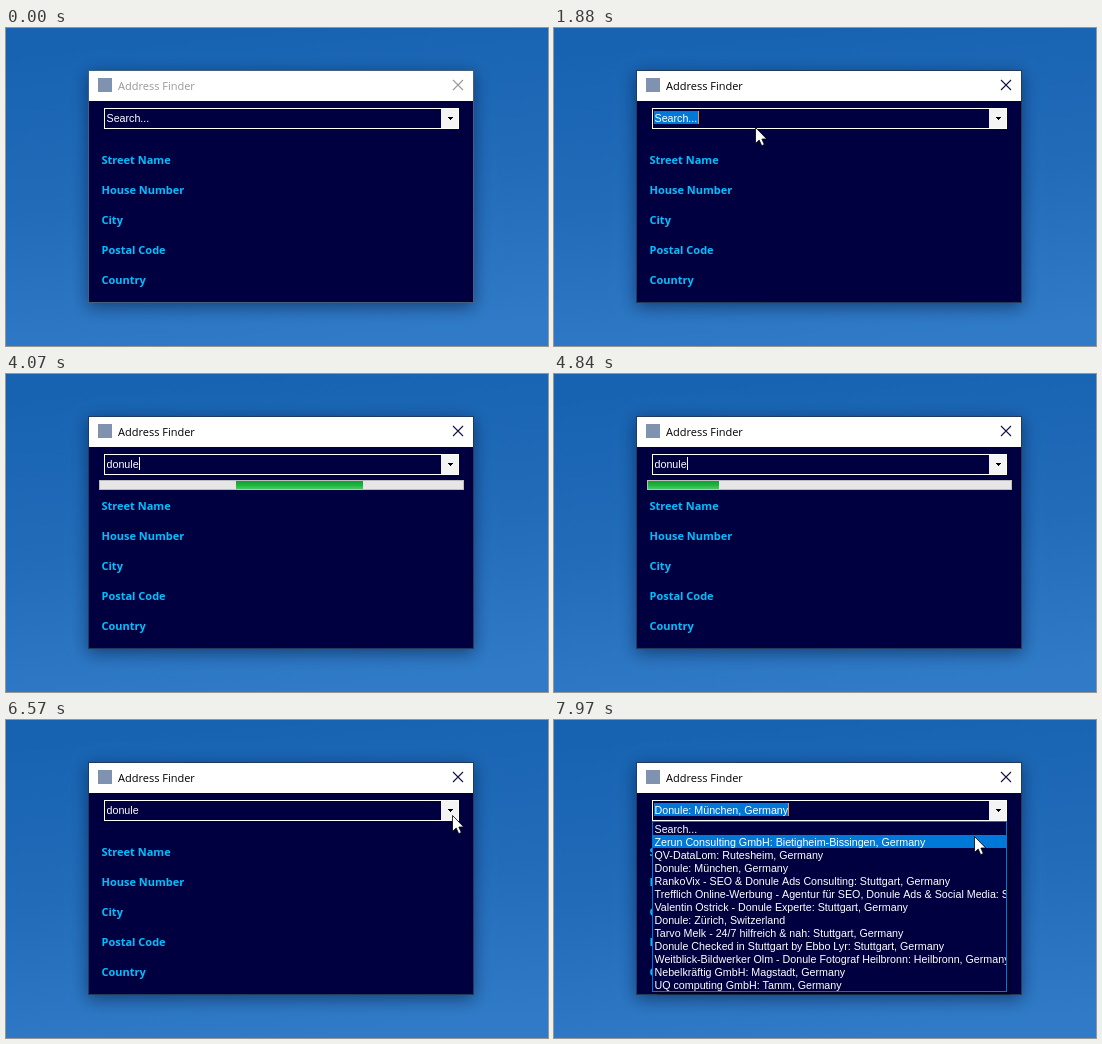
Recreate the animation shown at these times as an HTML page with a canvas. Size 542 by 318 pixels, loop 8 s.

```html
<!DOCTYPE html>
<html lang="en">
<head>
<meta charset="utf-8">
<title>Address Finder</title>
<style>
html, body { margin: 0; width: 100%; height: 100%; overflow: hidden; background: #2269b6; }
canvas { display: block; width: 542px; height: 318px; }
</style>
</head>
<body>
<canvas id="stage" width="542" height="318"></canvas>
<script>
const ctx = document.getElementById('stage').getContext('2d');
const LOOP = 8000, TICK = 156.25, LEAD = 18;
const NAVY = '#000040', BLUE = '#0078d7', SKY = '#00bfff';
const UI = '"Open Sans", "Noto Sans", sans-serif';
const FIELD = '10.7px "Liberation Sans", Arial, sans-serif';

const LABELS = ['Street Name', 'House Number', 'City', 'Postal Code', 'Country'];
const RESULTS = [
  'Search...',
  'Zerun Consulting GmbH: Bietigheim-Bissingen, Germany',
  'QV-DataLom: Rutesheim, Germany',
  'Donule: München, Germany',
  'RankoVix - SEO & Donule Ads Consulting: Stuttgart, Germany',
  'Trefflich Online-Werbung - Agentur für SEO, Donule Ads & Social Media: Stuttgart',
  'Valentin Ostrick - Donule Experte: Stuttgart, Germany',
  'Donule: Zürich, Switzerland',
  'Tarvo Melk - 24/7 hilfreich & nah: Stuttgart, Germany',
  'Donule Checked in Stuttgart by Ebbo Lyr: Stuttgart, Germany',
  'Weitblick-Bildwerker Olm - Donule Fotograf Heilbronn: Heilbronn, Germany',
  'Nebelkräftig GmbH: Magstadt, Germany',
  'UQ computing GmbH: Tamm, Germany'
];

// Events, counted in screen ticks
const ACTIVE = 5, BAR_ON = 17, BAR_OFF = 39, OPEN = 44, HOVER = 51;
const QUERY = 'donule', KEYS = [16, 18, 20, 21, 23, 24];
const PATH_IN = [[440, 190], [360, 150], [270, 115], [215, 92], [185, 86],
  [172, 84], [180, 88], [195, 95], [201, 99]];
const PATH_BACK = [[486, 123], [478, 148], [466, 140], [458, 124], [452, 110],
  [448, 100], [446, 95], [446, 94]];

function box(x, y, w, h, color) {
  ctx.fillStyle = color;
  ctx.fillRect(x, y, w, h);
}

function frame(x, y, w, h, color) {
  ctx.strokeStyle = color;
  ctx.lineWidth = 1;
  ctx.strokeRect(x + .5, y + .5, w - 1, h - 1);
}

function text(str, x, y, font, color) {
  ctx.font = font;
  ctx.fillStyle = color;
  ctx.fillText(str, x, y);
}

function gradient(x0, y0, x1, y1, ...colors) {
  const g = ctx.createLinearGradient(x0, y0, x1, y1);
  colors.forEach((c, i) => g.addColorStop(i / (colors.length - 1), c));
  return g;
}

function drawWindow(active) {
  box(0, 0, 542, 318, gradient(255, 0, 285, 318, '#1763b2', '#226bb9', '#307ac7'));
  ctx.save();
  ctx.shadowColor = 'rgba(0, 10, 40, .5)';
  ctx.shadowBlur = 16;
  ctx.shadowOffsetY = 4;
  box(82, 42, 386, 233, active ? '#1f3b5e' : '#42617f');
  ctx.restore();
  box(83, 43, 384, 30, '#fff');
  box(83, 73, 384, 201, NAVY);
  box(92, 50, 14, 14, '#7f92b0');
  text('Address Finder', 112, 62, '11px ' + UI, active ? '#000' : '#999');

  ctx.strokeStyle = active ? '#10104a' : '#999';
  ctx.lineWidth = 1.1;
  ctx.beginPath();
  ctx.moveTo(447, 52); ctx.lineTo(457, 62);
  ctx.moveTo(457, 52); ctx.lineTo(447, 62);
  ctx.stroke();

  LABELS.forEach((s, i) => text(s, 95.5, 136 + i * 30, 'bold 11px ' + UI, SKY));
}

function drawField(value, selected, caret) {
  frame(98, 80, 355, 21, '#fff');
  box(435, 81, 17, 19, '#f4f4f4');
  box(442, 89, 5, 1, '#000');
  box(443, 90, 3, 1, '#000');
  box(444, 91, 1, 1, '#000');

  ctx.font = FIELD;
  const end = Math.round(100.8 + ctx.measureText(value).width);
  if (selected) box(100, 83, end - 100, 13, BLUE);
  text(value, 100.5, 94, FIELD, '#fff');
  if (caret) box(end, 83, 1, 13, selected ? '#ff8728' : '#fff');
}

function drawMarquee(k) {
  box(93, 106, 365, 10, '#bcbcbc');
  box(94, 107, 363, 8, '#e6e6e6');
  const x = (335 + 60 * (k - 19)) % 492 - 33;
  const left = Math.max(94, x), right = Math.min(457, x + 127);
  if (right > left) box(left, 107, right - left, 8, gradient(0, 107, 0, 115, '#0ea32b', '#1cb33c', '#4cc868'));
}

function drawList(hot) {
  box(103, 106, 354, 169, 'rgba(0, 0, 0, .3)');
  box(98, 101, 355, 171, NAVY);
  ctx.save();
  ctx.beginPath();
  ctx.rect(99, 102, 353, 169);
  ctx.clip();
  RESULTS.forEach((s, i) => {
    const y = 102 + i * 13;
    if (i === hot) box(99, y, 353, 13, BLUE);
    text(s, 100.5, y + 11, FIELD, '#fff');
  });
  ctx.restore();
  frame(98, 101, 355, 171, BLUE);
}

function drawPointer([x, y]) {
  ctx.save();
  ctx.translate(x + .5, y + .5);
  ctx.beginPath();
  ctx.moveTo(0, 0);
  [[0, 16], [3.7, 12.6], [6.2, 18.2], [8.8, 17], [6.4, 11.6], [11.2, 11.4]]
    .forEach(p => ctx.lineTo(...p));
  ctx.closePath();
  ctx.fillStyle = '#fff';
  ctx.fill();
  ctx.strokeStyle = '#000';
  ctx.lineWidth = .8;
  ctx.stroke();
  ctx.restore();
}

function pointerAt(k) {
  if (k < 1) return null;
  if (k < KEYS[0]) return PATH_IN[Math.min(k, PATH_IN.length) - 1];
  if (k < 36) return null;
  if (k < OPEN) return PATH_BACK[k - 36];
  return k < HOVER ? [446, 95] : [420, 116];
}

// Caret blinks every 530 ms, starting lit after each edit
function blink(k, since) {
  return Math.floor((k - since) * TICK / 530) % 2 === 0;
}

function draw(now) {
  const k = Math.floor((now % LOOP + LEAD) / TICK);
  const typed = KEYS.filter(t => t <= k);
  drawWindow(k >= ACTIVE);

  if (k >= OPEN) drawField(RESULTS[3], true, blink(k, OPEN));
  else if (typed.length) drawField(QUERY.slice(0, typed.length), false, blink(k, typed[typed.length - 1]));
  else drawField(RESULTS[0], k >= ACTIVE, k >= ACTIVE && blink(k, ACTIVE));

  if (k >= BAR_ON && k < BAR_OFF) drawMarquee(k);
  if (k >= OPEN) drawList(k < HOVER ? 3 : 1);
  const tip = pointerAt(k);
  if (tip) drawPointer(tip);
}

const start = performance.now();
function loop() {
  draw(performance.now() - start);
  requestAnimationFrame(loop);
}
loop();
</script>
</body>
</html>
```
